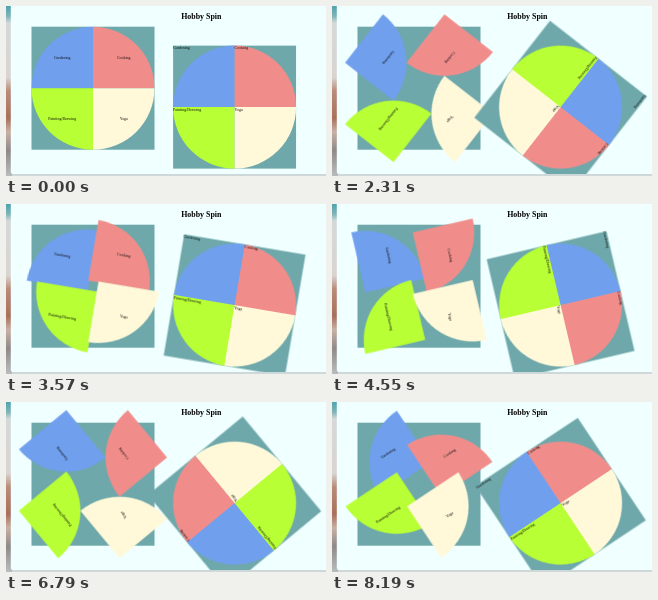
Animation of 320x170 px, one loop 8.26 s. Source, as an HTML page:

```html
<!DOCTYPE html>
<html lang="en">
<head>
<meta charset="utf-8">
<title>Hobby Spin</title>
<style>
  html, body { margin: 0; width: 100%; height: 100%; overflow: hidden; background: #f0ffff; }
  svg { display: block; width: 100vw; height: 100vh; }
  text { font: 3.94px "Liberation Serif", "Times New Roman", serif; fill: #111; }
  .title { font-size: 7.9px; font-weight: bold; fill: #000; }
  .mid { text-anchor: middle; }
  .board { fill: #6ea8aa; }
  .garden { fill: #709fee; }
  .cook { fill: #f08d8b; }
  .paint { fill: #b8ff35; }
  .yoga { fill: #fff9d9; }

  /* short rest, one turn back in 45 steps, then forward at 4.8deg a step */
  .spin { animation: spin 8260ms -4ms infinite; }
  @keyframes spin {
    0% { transform: rotate(0deg); animation-timing-function: step-end; }
    3.389831% { transform: rotate(0deg); animation-timing-function: steps(45); }
    41.525424% { transform: rotate(-360deg); animation-timing-function: steps(69); }
    100% { transform: rotate(-28.8deg); }
  }
</style>
</head>
<body>
<svg viewBox="0 0 320 170" preserveAspectRatio="none">
  <defs>
    <path id="sector" d="M30.75 30.75V-30.75A61.5 61.5 0 0 0 -30.75 30.75Z"/>
    <clipPath id="page"><path d="M4.8 0H320V168H7.3Q4.8 168 4.8 165.5Z"/></clipPath>
    <linearGradient id="wall" x2="0" y2="1">
      <stop offset="0" stop-color="#4fa3ad"/>
      <stop offset=".06" stop-color="#7fb4b8"/>
      <stop offset=".1" stop-color="#d5d8d8"/>
      <stop offset=".42" stop-color="#d9d4d0"/>
      <stop offset=".5" stop-color="#b98c78"/>
      <stop offset=".66" stop-color="#a8705c"/>
      <stop offset=".74" stop-color="#c9b0a4"/>
      <stop offset=".85" stop-color="#8f8a88"/>
      <stop offset="1" stop-color="#b9bcbd"/>
    </linearGradient>
  </defs>

  <rect width="320" height="170" fill="#cfd8d9"/>
  <rect width="6" height="170" fill="url(#wall)"/>

  <g clip-path="url(#page)">
    <rect width="320" height="170" fill="#f0ffff"/>
    <text class="title mid" x="195.3" y="13.4">Hobby Spin</text>

    <!-- each sector turns about its own middle -->
    <g transform="translate(87 82.2)">
      <rect class="board" x="-61.5" y="-61.5" width="123" height="123"/>
      <g transform="translate(-30.75 -30.75)"><g class="spin">
        <use href="#sector" class="garden"/>
        <text class="mid" y="1.2">Gardening</text>
      </g></g>
      <g transform="translate(30.75 -30.75)"><g class="spin">
        <use href="#sector" class="cook" transform="scale(-1 1)"/>
        <text class="mid" y="1.2">Cooking</text>
      </g></g>
      <g transform="translate(-30.75 30.75)"><g class="spin">
        <use href="#sector" class="paint" transform="scale(1 -1)"/>
        <text class="mid" y="1.2">Painting/Drawing</text>
      </g></g>
      <g transform="translate(30.75 30.75)"><g class="spin">
        <use href="#sector" class="yoga" transform="scale(-1 -1)"/>
        <text class="mid" y="1.2">Yoga</text>
      </g></g>
    </g>

    <!-- the whole board turns as one -->
    <g transform="translate(228.6 101.1)"><g class="spin">
      <rect class="board" x="-61.5" y="-61.5" width="123" height="123"/>
      <use href="#sector" class="garden" transform="translate(-30.75 -30.75)"/>
      <use href="#sector" class="cook" transform="translate(30.75 -30.75) scale(-1 1)"/>
      <use href="#sector" class="paint" transform="translate(-30.75 30.75) scale(1 -1)"/>
      <use href="#sector" class="yoga" transform="translate(30.75 30.75) scale(-1 -1)"/>
      <text x="-61.5" y="-58">Gardening</text>
      <text x="0" y="-58">Cooking</text>
      <text x="-61.5" y="3.5">Painting/Drawing</text>
      <text x="0" y="3.5">Yoga</text>
    </g></g>
  </g>
</svg>
</body>
</html>
```
